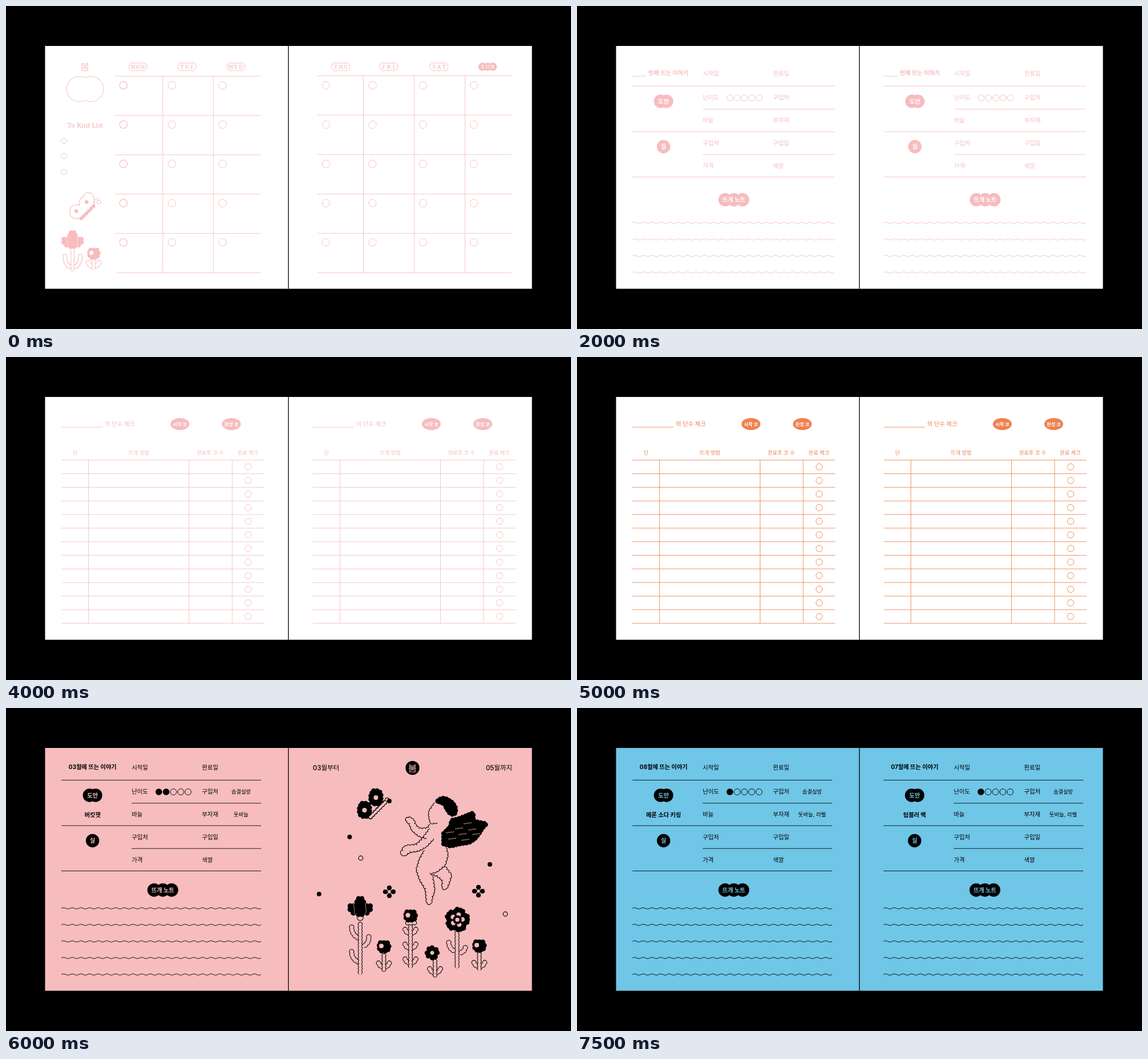
Recreate the animation shown at these times as an HTML page. Size 989 by 566 pixels, loop 8 s.

```html
<!DOCTYPE html>
<html lang="ko">
<head>
<meta charset="utf-8">
<title>Knitting diary</title>
<style>
html, body { margin: 0; width: 100%; height: 100%; overflow: hidden; background: #000; }
svg { display: block; width: 989px; height: 566px; }
text { font-family: Inter, 'Noto Sans CJK KR', 'Noto Sans CJK JP', sans-serif; }
.slab { font-family: 'Noto Serif', serif; }
</style>
</head>
<body>
<svg id="stage" viewBox="0 0 989 566"></svg>
<script>
const SVG = 'http://www.w3.org/2000/svg';
const HOLD = 500;
const BLACK = '#000';
const WHITE = '#fff';
const seasons = [
  { name: '봄', color: '#f7bcbe' },
  { name: '여름', color: '#6fc6e7' },
  { name: '가을', color: '#ee8150' },
  { name: '겨울', color: '#c3c8d8' }
];

const range = n => [...Array(n).keys()];
const each = (list, fn) => list.map(fn).join('');

// Basic shapes
const line = (d, ink, w = 0.85) => `<path d="${d}" fill="none" stroke="${ink}" stroke-width="${w}"/>`;
const dot = (x, y, r, ink) => `<circle cx="${x}" cy="${y}" r="${r}" fill="${ink}"/>`;
const ring = (x, y, r, ink, w = 0.9) => `<circle cx="${x}" cy="${y}" r="${r}" fill="none" stroke="${ink}" stroke-width="${w}"/>`;
const group = (x, y, body, scale = 1) => `<g transform="translate(${x} ${y}) scale(${scale})">${body}</g>`;
const turned = (angle, body) => `<g transform="rotate(${angle})">${body}</g>`;
const label = (x, y, s, size, ink, weight = 400, anchor = 'start') =>
  `<text x="${x}" y="${y + size * 0.38}" font-size="${size}" font-weight="${weight}" text-anchor="${anchor}" fill="${ink}">${s}</text>`;
const centered = (x, y, s, size, ink, weight = 400) => label(x, y, s, size, ink, weight, 'middle');

// Crochet shapes: bead rows, filled bead shapes, outlined bead tubes and scalloped outlines
const beads = (d, r, ink, step = 6) =>
  `<path d="${d}" fill="none" stroke="${ink}" stroke-width="${r * 2}" stroke-linecap="round" stroke-dasharray="0 ${step}"/>`;
const blob = (d, r, ink, step = 6) => `<path d="${d}" fill="${ink}"/>` + beads(d, r, ink, step);
const tube = (d, r, ink, paper, step = 6) =>
  beads(d, r, ink, step) + beads(d, r - 1.1, paper, step) + line(d, paper, r);
function scallop(d, ink, step = 6, sweep = 1, w = 1.1) {
  const path = document.createElementNS(SVG, 'path');
  path.setAttribute('d', d);
  const length = path.getTotalLength();
  const n = Math.round(length / step);
  const at = i => {
    const p = path.getPointAtLength(length * i / n);
    return p.x.toFixed(1) + ' ' + p.y.toFixed(1);
  };
  const r = step * 0.58;
  return line('M' + at(0) + each(range(n), i => `A${r} ${r} 0 0 ${sweep} ${at(i + 1)}`), ink, w);
}
const wave = (x, y, width, ink) => {
  const u = width / 46;
  return line(`M${x} ${y}q${u / 2} -2.6 ${u} 0` + `t${u} 0`.repeat(45), ink, 0.9);
};

// Overlapping circles, filled or as one outline
const cluster = (x, y, n, gap, r, ink) => each(range(n), i => dot(x + (i - (n - 1) / 2) * gap, y, r, ink));
const outlined = (x, y, n, gap, r, ink, paper) =>
  cluster(x, y, n, gap, r + 0.4, ink) + cluster(x, y, n, gap, r - 0.5, paper);

// Flowers, drawn around the middle of the head
const tulip = (ink, paper) => {
  const core = 'M-3 -14h6.1M-6 -8h12.1M-7 -2h14M-6 4h12.1M-6 9h12.1M-3 14h6.1';
  return beads('M-17.5 -1h6.1M-17.5 5h12.1M-12 11h6.1M17.5 -1h-6.1M17.5 5h-12.1M12 11h-6.1', 4.7, ink)
    + beads(core, 5, paper) + `<path d="M-6 -8H6V9H-6Z" fill="${ink}"/>` + beads(core, 4.4, ink);
};
const daisy = (ink, paper) =>
  blob('M-6 -7H6L9 0 6 7H-6L-9 0Z', 4.5, ink, 6.2) + dot(-4.5, -1.5, 4, paper);
const rosette = (ink, paper) =>
  each(range(5), i => turned(i * 72 + 15, blob('M-5 -18H5L8 -12 3 -7H-3L-8 -12Z', 4, ink, 5.6)))
  + each(range(5), i => turned(i * 72 + 15, dot(0, -9, 4, paper)))
  + ring(0, 0, 5.5, ink, 4.5) + dot(0, 0, 3.6, paper);
const pinwheel = (ink, paper) =>
  each(range(4), i => turned(i * 90, beads('M-3 -8.5h6.1', 4.2, ink) + dot(0, -4, 4.5, ink))) + dot(0, 0, 3.4, paper);
const cross = (x, y, ink) =>
  each([[0, -7], [7, 0], [0, 7], [-7, 0]], ([dx, dy]) => dot(x + dx, y + dy, 4.1, ink)) + ring(x, y, 3.4, ink, 1);
const leafPair = (x, y, ink, paper) =>
  tube(`M${x - 9.5} ${y}q2 6 8 7M${x + 9.5} ${y}q-2 6 -8 7`, 4.4, ink, paper, 5);
const sprig = (x, top, bottom, ink, paper) =>
  leafPair(x, bottom - 14, ink, paper) + tube(`M${x} ${top}V${bottom}`, 4, ink, paper);

// Small pictures beside the calendar
const decorations = [
  (ink, paper) =>
    scallop('M130 349V338L137 334 139 328H149L153 334 154 348', ink, 5)
    + scallop('M129 371H118L113 366V354L118 349H130', ink, 5)
    + dot(141, 343, 3.2, ink) + dot(123, 359, 3.2, ink)
    + beads('M132 371.5L153.5 350', 3.2, ink)
    + scallop('M154 346Q154 336 163 338', ink, 4) + ring(162.5, 343, 3.2, ink, 1.1)
    + tube('M103 438q-1 12 10 20M130 438q1 12 -10 20', 4, ink, paper, 5)
    + tube('M116.5 425V464', 3.7, ink, paper) + group(116.5, 409, tulip(ink, paper), 0.88)
    + leafPair(153.5, 449, ink, paper)
    + tube('M153.5 446V464', 3.6, ink, paper) + group(153.5, 433.5, daisy(ink, paper), 0.92),
  (ink, paper) =>
    group(150, 350, each(range(10), i => turned(i * 36, beads('M0 -13v-6.1', 2.5, ink, 5))) + dot(0, 0, 9, ink))
    + scallop('M110 402H140V424L125 448 110 424Z', ink, 5)
    + beads('M113 400h24.1M116 394h18.1M119 388h12.1', 4, ink)
    + each([458, 465], y => scallop(`M98 ${y}H170`, ink, 8))
    + dot(158, 420, 3, ink) + dot(106, 372, 3, ink),
  (ink, paper) =>
    tube('M118 425V463', 6, ink, paper) + beads('M103 420h30.1M106 414h24.1M112 408h12.1', 4.5, ink)
    + dot(113, 416, 3, paper) + dot(124, 414, 3, paper)
    + tube('M153 446V466', 3.6, ink, paper) + group(153, 437, daisy(ink, paper), 0.9)
    + scallop('M125 370L122 355 135 350 140 336 151 341 164 338 162 352 155 364 141 372Z', ink, 5)
    + beads('M126 376L154 348', 2.5, ink, 5) + dot(108, 350, 3, ink),
  ink =>
    each([[145, 333], [110.5, 364], [120, 390], [100, 422.5], [160, 448.5], [148.5, 462], [109, 465], [112.5, 465]],
      ([x, y]) => dot(x, y, 3, ink))
    + group(159.5, 381.5, each(range(8), i => turned(i * 45 + 15, beads('M0 -5v-12.1M-4 -15h8.1', 2.5, ink, 4))))
    + `<rect x="112.5" y="423" width="29" height="30" rx="2" fill="none" stroke="${ink}"/>`
    + beads('M127 422v28.1M115 438h24.1', 3, ink, 4)
    + beads('M115.5 421l3 -4 5 2 3 4 4 -4 5 -2 3.5 5', 2.8, ink, 5)
];

const springGlyph = ink => line('M-5 -7v5.5h10v-5.5M-5 -4.3h10M-7 1h14M0 1v2.5M-5 3.5h10v4h-10z', ink, 1.2);
const seasonName = (x, y, i, size, ink, weight = 400) =>
  i ? centered(x, y, seasons[i].name, size, ink, weight) : group(x, y, springGlyph(ink), size / 15);

const pages = paper =>
  `<path d="M68.4 69.9H920.6V495.6H68.4Z" fill="${paper}"/>` + line('M494.4 69.9V495.6', BLACK, 1.3);

function calendar(i) {
  const ink = seasons[i].color;
  const days = { MON: 231, TUE: 317, WED: 402.5, THU: 586, FRI: 670, SAT: 758, SUN: 843 };
  const dayBadge = ([day, x]) => {
    const sunday = day === 'SUN';
    const letters = sunday ? WHITE : ink;
    const shape = sunday ? cluster(x, 106, 3, 9, 7.2, ink) : outlined(x, 106, 3, 9, 7.1, ink, WHITE);
    return shape + `<text class="slab" x="${x - 8.7} ${x} ${x + 8.7}" y="109.4" font-size="9.4" text-anchor="middle" fill="${letters}" stroke="${letters}" stroke-width=".2">${day}</text>`;
  };
  const columns = [205.5, 290.5, 379, 560, 641.5, 730, 819];
  const body = seasonName(138, 105.5, i, 15, ink)
    + outlined(138.5, 145, 2, 20, 22.3, ink, WHITE)
    + `<text class="slab" x="139" y="212" font-size="11.6" text-anchor="middle" fill="${ink}" stroke="${ink}" stroke-width=".25">To Knit List</text>`
    + each([235.5, 263, 290.5], y => ring(101.5, y, 4.4, ink))
    + each(Object.entries(days), dayBadge)
    + each(range(6), k => line(`M${k < 5 ? 190.5 : 194} ${122.5 + k * 68.9}H446M545 ${121.5 + k * 69.1}H885`, ink))
    + line('M274.5 122.5V467M363 122.5V467M625.5 121.5V467M714.5 121.5V467M803.5 121.5V467', ink)
    + each(columns, (x, c) => each(range(5), k => ring(x, 138.5 + k * 68.8, 6.7, ink, c ? 0.9 : 1.2)))
    + decorations[i](ink, WHITE);
  return pages(WHITE) + group(0, i ? 0 : 0.5, body);
}

// One story page; an entry fills it in, otherwise it is a blank form
function story(x, ink, paper, entry) {
  const up = entry ? -14 : 0;
  const width = entry ? 349.5 : 354;
  const end = 97 + width;
  const badgeY = 167 + up;
  const noteY = entry ? 319 : 339.5;
  const field = (fx, y, s) => label(fx, y + up, s, 10.4, ink);
  const level = entry ? entry.level : 0;
  const title = entry
    ? centered(151.5, 103.5, entry.month + '월에 뜨는 이야기', 10.2, ink, 700)
      + centered(151.5, 187, entry.item, 10.2, ink, 700)
      + centered(411.5, 146.5, '솜결실방', 9.3, ink) + centered(411.5, 186.5, entry.tool, 9.4, ink)
    : line('M97 123H121.5', ink) + label(125, 117.5, '번째 뜨는 이야기', 10.1, ink, 700);
  return group(x, 0, title
    + field(220, 118, '시작일') + field(343, 118, '완료일')
    + field(220, 160.5, '난이도') + field(343, 160.5, '구입처')
    + field(220, 200.5, '바늘') + field(343, 200.5, '부자재')
    + field(220, 240.5, '구입처') + field(343, 240.5, '구입일')
    + field(220, 280, '가격') + field(343, 280, '색깔')
    + each([140.4, 220.2, 299.5], y => line(`M97 ${y + up}H${end}`, ink))
    + each([180.8, 260.2], y => line(`M220 ${y + up}H${end}`, ink))
    + each(range(5), k => (k < level ? dot : ring)(267.5 + k * 12.8, 161 + up, k < level ? 5.8 : 5.4, ink))
    + cluster(151.5, badgeY, 2, 10.6, 11.7, ink) + centered(151.5, badgeY, '도안', 10.3, paper, 700)
    + dot(151.5, 246.5 + up, 11.7, ink) + centered(151.5, 246.5 + up, '실', 10.3, paper, 700)
    + cluster(274.5, noteY, 3, 15.3, 11.7, ink) + centered(274.5, noteY, '뜨개 노트', 10.2, paper, 700)
    + each(range(entry ? 5 : 4), k => wave(97, 467 - k * 29, width, ink)));
}

function checklist(x, ink) {
  const row = 23.83;
  const pill = (px, s) => `<ellipse cx="${px}" cy="117.5" rx="16.5" ry="10.5" fill="${ink}"/>` + centered(px, 117.5, s, 8.2, WHITE, 700);
  const heads = [[121, '단'], [232.5, '뜨개 방법'], [357.5, '완료후 코 수'], [423.5, '완료 체크']];
  return group(x, 0, line('M97 123H169', ink)
    + label(173, 117.5, '의 단수 체크', 10.2, ink, 500)
    + pill(304.5, '시작 코') + pill(394.5, '완성 코')
    + each(heads, ([hx, s]) => centered(hx, 168, s, 9.2, ink, 500))
    + each(range(13), k => line(`M97 ${180.7 + k * row}H452`, ink))
    + line('M144.5 180.7V466.7M320.5 180.7V466.7M396 180.7V466.7', ink)
    + each(range(12), k => ring(424, 192.5 + k * row, 5.6, ink)));
}

const chapterHead = (i, from, to, paper) =>
  label(537, 104.5, from + '월부터', 11.5, BLACK, 500) + label(886, 104.5, to + '월까지', 11.5, BLACK, 500, 'end')
  + dot(711.5, 105, 12.2, BLACK) + seasonName(711.5, 105, i, i ? 10 : 14, paper, 700);

function cherub(paper) {
  const hair = 'M756 163L763 158 772 160 781 166 786 173 787 183 783 187 776 183 771 175 768 168Z';
  const wing = 'M766 238L766 220 778 208 780 197 792 194 803 190 812 186 818 184 818 198 841 203 834 210 828 220 820 230 810 236 795 238 778 242Z';
  const front = [
    'M751 166L746 173 740 182 741 191 743 202 755 201',
    'M743 204L738 211 724 212 716 205 713 194 704 192 698 196 706 202 711 214 722 224 736 228',
    'M742 212L727 232 718 240 697 242 694 250 689 256 697 259 707 252 722 250 735 243 748 229',
    'M733 250L724 266 719 284 725 301 735 318 737 342 743 346 746 330 750 321 746 295'
  ];
  const back = [
    'M770 245L773 258 768 275 752 288 742 289',
    'M768 278L779 293 775 307 769 320 764 314 765 302 756 294 743 290'
  ];
  const feathers = [[770, 218], [786, 211], [801, 202], [774, 229], [792, 221], [809, 213], [797, 231], [816, 221]];
  return each(front, d => scallop(d, BLACK, 6, 0)) + each(back, d => scallop(d, BLACK))
    + blob(hair, 4.5, BLACK, 5.5) + blob(wing, 4.2, BLACK)
    + each(feathers, ([x, y]) => scallop(`M${x} ${y}l14 -2`, paper, 4.7, 0, 0.9));
}

function springScene(paper) {
  const stem = (d, r = 4.2) => tube(d, r, BLACK, paper);
  const leaf = d => tube(d, 4.6, BLACK, paper, 5.5);
  const wing = 'M-4 -11H5L9 -6V7L4 12H-5L-9 7V-5Z';
  return chapterHead(0, '03', '05', paper)
    + stem('M638 191L669 159', 4)
    + each([[647.5, 156], [627.5, 178]], ([x, y]) => group(x, y, blob(wing, 4.2, BLACK) + dot(0, 1, 4, paper)))
    + stem('M638 191L665 164', 3.6) + dot(671, 163, 4, BLACK)
    + cherub(paper)
    + each([[601.5, 226], [847, 274], [548, 326]], ([x, y]) => dot(x, y, 4, BLACK))
    + each([[621, 263], [874, 361]], ([x, y]) => ring(x, y, 3.8, BLACK, 1.2))
    + cross(671, 322, BLACK) + cross(827, 321, BLACK)
    + leaf('M605 384q0 13 12 19M635 401q1 12 -11 17M605 427q0 13 12 18')
    + stem('M620 379V467') + stem('M620 367V371', 6) + group(620, 348, tulip(BLACK, paper))
    + sprig(661.5, 434, 461, BLACK, paper) + group(661.5, 418.5, daisy(BLACK, paper))
    + each([388, 414, 440], y => leafPair(708, y, BLACK, paper))
    + stem('M708 380V457') + stem('M703 376.5h12.1') + group(708, 364.5, daisy(BLACK, paper))
    + sprig(751, 444, 471, BLACK, paper) + group(746, 429, turned(-20, pinwheel(BLACK, paper)))
    + leaf('M775 411q1 12 11 15M804 420q-2 9 -11 9')
    + stem('M789.5 392V456') + group(790, 371, rosette(BLACK, paper))
    + sprig(828.5, 432, 460, BLACK, paper) + group(828.5, 417, daisy(BLACK, paper));
}

function summerScene(paper) {
  const sun = each(range(12), i => turned(i * 30, beads('M0 -40v-12.1', 4, BLACK)))
    + dot(0, 0, 28, BLACK) + beads('M0 -28a28 28 0 1 1 -.1 0', 4.2, BLACK, 7) + ring(0, 0, 18, paper, 1);
  return chapterHead(1, '06', '08', paper)
    + group(640, 195, sun)
    + scallop('M738 290H802V320L770 395 738 320Z', BLACK)
    + beads('M742 284h56.1M748 276h44.1M748 268h44.1M754 260h32.1M760 252h20.1', 5, BLACK)
    + each(range(4), k => scallop(`M548 ${418 + k * 17}H874`, BLACK, 12))
    + group(620, 360, rosette(BLACK, paper))
    + cross(700, 326, BLACK) + cross(840, 210, BLACK)
    + each([[560, 290], [847, 354], [735, 166]], ([x, y]) => dot(x, y, 4, BLACK))
    + each([[676, 275], [866, 286]], ([x, y]) => ring(x, y, 3.8, BLACK, 1.2));
}

const diary = (i, ...entries) => {
  const paper = seasons[i].color;
  const scene = i ? summerScene : springScene;
  return pages(paper) + story(0, BLACK, paper, entries[0])
    + (entries[1] ? story(439.5, BLACK, paper, entries[1]) : scene(paper));
};
const entry = (month, item, level, tool) => ({ month, item, level, tool });

const slides = [
  ...seasons.map((s, i) => calendar(i)),
  ...seasons.map(s => pages(WHITE) + story(0, s.color, WHITE) + story(440, s.color, WHITE)),
  ...seasons.map(s => pages(WHITE) + checklist(0, s.color) + checklist(440, s.color)),
  diary(0, entry('03', '버킷햇', 2, '돗바늘')),
  diary(0, entry('05', '꽃 코스터', 1, '돗바늘'), entry('04', '튤립 파우치', 2, '돗바늘')),
  diary(1, entry('06', '네트 백', 2, '돗바늘')),
  diary(1, entry('08', '메론 소다 키링', 1, '돗바늘, 라벨'), entry('07', '텀블러 백', 1, '돗바늘, 라벨'))
];

const stage = document.getElementById('stage');
stage.innerHTML = each(slides, s => `<g display="none">${s}</g>`);
let shown = -1;
function render(time) {
  const index = Math.floor(time / HOLD) % slides.length;
  if (index !== shown) {
    [...stage.children].forEach((g, i) => g.setAttribute('display', i === index ? 'inline' : 'none'));
    shown = index;
  }
}
function tick() {
  render(performance.now());
  requestAnimationFrame(tick);
}
tick();
</script>
</body>
</html>
```
